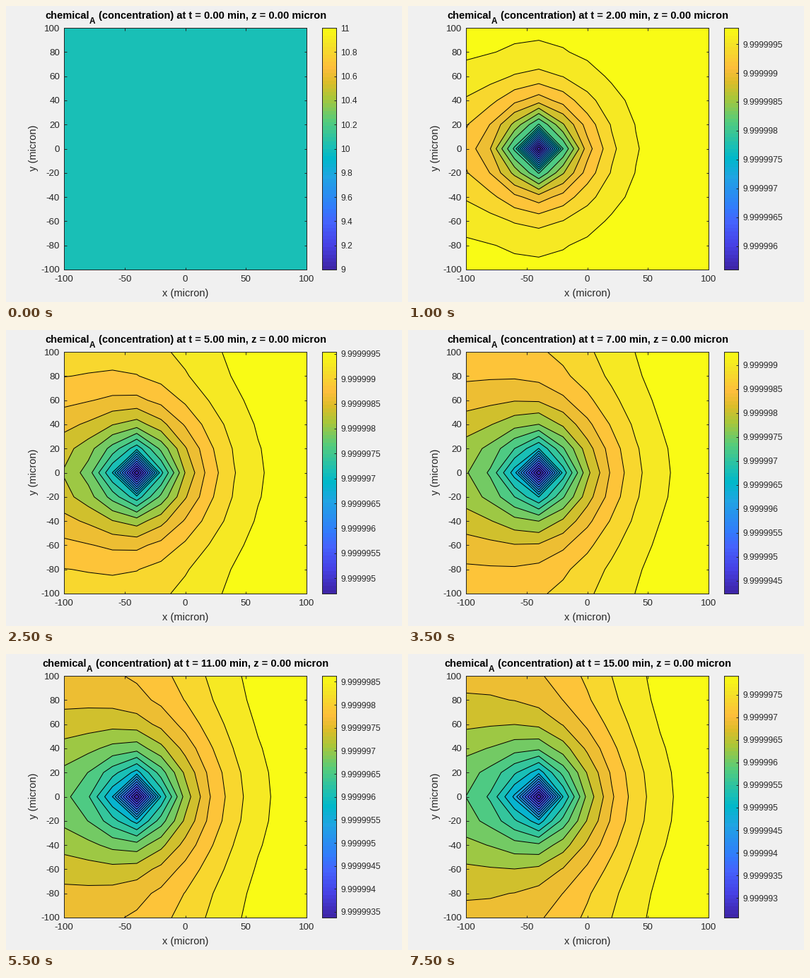
A matplotlib script for the animation above (8 s loop, 560x420 px).

```python
import math

import numpy as np
import matplotlib.pyplot as plt
from matplotlib.animation import FuncAnimation
from matplotlib.colors import LinearSegmentedColormap

W, H, DPI = 560, 420, 80
PX = 72 / DPI                 # points per pixel
INK = "#262626"
FRAMES = 16
LEVELS = 20

plt.rcParams["font.family"] = "Liberation Sans"

# Key colours of parula at their place among 64 shades
STOPS = {0: "#3e26a8", 6: "#4741e5", 12: "#4563fd", 16: "#327cfc",
         24: "#20a5e3", 29: "#01b8ca", 32: "#19bfb6", 39: "#57cc7a",
         45: "#abc739", 49: "#dcbd29", 53: "#febe3c", 59: "#f5e327",
         63: "#f9fb15"}
cmap = LinearSegmentedColormap.from_list(
    "parula", [(k / 63, c) for k, c in STOPS.items()], N=64)
shades = [cmap(k / LEVELS) for k in range(LEVELS + 1)]

# Diffusion with one point sink on an 11 x 11 no-flux grid;
# values are the change from 10, in units of 1e-6.
N, STEP = 11, 20.0
DIFFUSION, UPTAKE, DT = 1000.0, 23.4, 0.01
SINK = (5, 3)
grid = np.linspace(-100, 100, N)


def simulate():
    lap = 2 * np.eye(N) - np.eye(N, k=1) - np.eye(N, k=-1)
    lap[0, 0] = lap[-1, -1] = 1
    solve = np.linalg.inv(np.eye(N) + DT * DIFFUSION / STEP**2 * lap)
    z = np.zeros((N, N))
    out = [z.copy()]
    for _ in range(1, FRAMES):
        for _ in range(round(1 / DT)):
            z = solve @ z @ solve.T
            z[SINK] -= UPTAKE * DT
        out.append(z.copy())
    return out


fields = simulate()

fig = plt.figure(figsize=(W / DPI, H / DPI), dpi=DPI, facecolor="#f0f0f0")


def add_axes(x, y, w, h):
    a = fig.add_axes([x / W, y / H, w / W, h / H])
    a.set_axisbelow(False)
    for s in a.spines.values():
        s.set(linewidth=PX, color=INK)
    return a


def label(x, y, s, size, **kw):
    return fig.text(x / W, 1 - y / H, s, fontsize=size * PX,
                    va="baseline", **kw)


tick = dict(direction="in", length=3.5 * PX, width=PX,
            color=INK, labelcolor=INK)

ax = add_axes(82, 46, 343, 343)
ax.set(xlim=(-100, 100), ylim=(-100, 100))
xt, yt = range(-100, 101, 50), range(-100, 101, 20)
ax.set_xticks(xt, [str(v) for v in xt])
ax.set_yticks(yt, [str(v) for v in yt])
ax.tick_params(top=True, right=True, labelsize=13.33 * PX, **tick)
ax.tick_params(axis="x", pad=8.3 * PX)
ax.tick_params(axis="y", pad=6 * PX)

bar = add_axes(447, 46, 20, 343)
bar.imshow(np.arange(64)[:, None], cmap=cmap, origin="lower", aspect="auto",
           extent=(0, 1, 0, 1), interpolation="nearest")
bar.set_xticks([])
bar.yaxis.tick_right()
bar.tick_params(axis="y", labelsize=12 * PX, pad=6 * PX, **tick)

label(253.5, 412, "x (micron)", 14.67, ha="center", color=INK)
label(43.5, 201.5, "y (micron)", 14.67, ha="center", color=INK,
      rotation=90, rotation_mode="anchor")

bold = dict(ha="left", weight="bold", color="black")
title = [
    (55.2, label(0, 18, "chemical", 14.67, **bold)),
    (117.7, label(0, 25, "A", 11.73, **bold)),
    (130.7, label(0, 18, "", 14.67, **bold)),
]
contours = []


def set_title(minute):
    time = f"{minute:.2f}"
    title[2][1].set_text(f"(concentration) at t = {time} min, z = 0.00 micron")
    shift = 4.08 * (len(time) - 4)    # keeps the whole line centred
    for x, part in title:
        part.set_x((x - shift) / W)


def set_bar(lo, hi, values, names):
    bar.set_yticks([(v - lo) / (hi - lo) for v in values], names)
    bar.set_ylim(0, 1)


def update(i):
    while contours:
        contours.pop().remove()
    set_title(i)

    if i == 0:
        ax.set_facecolor(cmap(0.5))
        values = [9 + k / 5 for k in range(11)]
        set_bar(9, 11, values, [f"{v:g}" for v in values])
        return

    z = fields[i]
    levels = np.linspace(z.min(), z.max(), LEVELS + 2)
    lo, top = levels[0], levels[-2]
    edges = levels.copy()
    edges[0] -= 1e-6
    edges[-1] += 1e-6
    ax.set_facecolor(shades[-1])
    contours.append(ax.contourf(grid, grid, z, levels=edges, colors=shades))
    contours.append(ax.contour(grid, grid, z, levels=levels[1:-1],
                               colors="black", linestyles="solid",
                               linewidths=PX))

    values = [k / 2 for k in range(math.ceil(lo * 2), math.floor(top * 2) + 1)]
    set_bar(lo, top, values,
            [f"{10 + v * 1e-6:.7f}".rstrip("0") for v in values])


anim = FuncAnimation(fig, update, frames=FRAMES, interval=500,
                     repeat=True, repeat_delay=0, blit=False)
plt.show()
```
